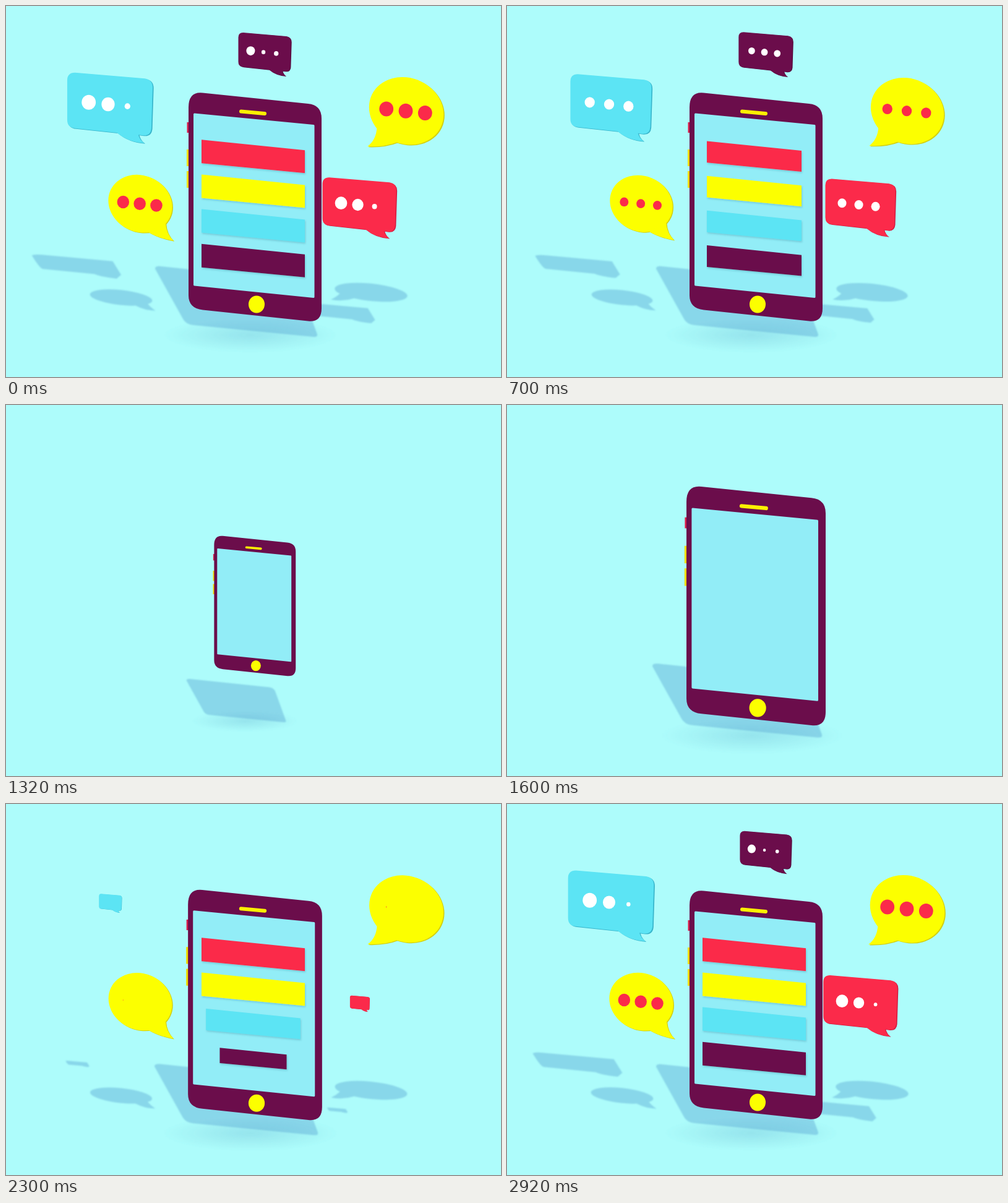
Animation of 800 by 600 pixels, one loop 2.94 s. Source, as an HTML page:

```html
<!DOCTYPE html>
<html>
<head>
<meta charset="utf-8">
<style>
html, body { margin: 0; width: 100%; height: 100%; overflow: hidden; background: #adfcfb; }
svg { display: block; width: 800px; height: 600px; }
</style>
</head>
<body>
<svg id="stage" viewBox="0 0 800 600">
  <defs>
    <!-- bubble shapes are centred on 0,0 -->
    <path id="box" d="M-67-37Q-67-49-55-49L53-40Q65-38 65-26L63 37Q62 49 50 48L43 47Q45 55 52 60Q26 58 10 44L-55 37Q-67 36-67 24Z"/>
    <g id="oval">
      <ellipse rx="59.5" ry="53.7"/>
      <path d="M-47 31Q-48 51-62 63Q-34 61-14 51Z"/>
    </g>
    <path id="boxShade" d="M-71-16Q-66-18-56-17L54-7L67 14L60 20Q34 17 26 13L-54 5Q-59 4-71-16Z"/>
    <path id="ovalShade" d="M-58 0A58 14 0 0 1 58 0A58 14 0 0 1-27 12.4Q-45 20-64 18Q-54 12-50 7Q-58 4-58 0Z"/>
    <radialGradient id="haze">
      <stop offset="0" stop-color="#5aa8c8" stop-opacity=".28"/>
      <stop offset="1" stop-color="#5aa8c8" stop-opacity="0"/>
    </radialGradient>
    <filter id="soft" x="-10%" y="-10%" width="120%" height="120%"><feGaussianBlur stdDeviation="1"/></filter>
    <filter id="lift" x="-10%" y="-20%" width="120%" height="150%">
      <feDropShadow dx="1" dy="2" stdDeviation="1.5" flood-color="#2a7f95" flood-opacity=".3"/>
    </filter>
  </defs>
  <g id="shades" fill="#5aa8d2" fill-opacity=".43" filter="url(#soft)">
    <g id="phoneShade">
      <ellipse cx="395" cy="532" rx="140" ry="28" fill="url(#haze)" fill-opacity="1"/>
      <path d="M241 425Q241 420 250 421L460 443Q470 444 475 454L503 531Q504 536 496 535L302 516Q291 515 286 506Z"/>
    </g>
  </g>
  <g id="phone">
    <path fill="#d81f4c" d="M292.500 188h5v17h-5z"/>
    <path fill="#f0dc00" d="M292 232h5v27h-5zM292 267h5v27h-5z"/>
    <path fill="#6b0d4b" d="M295 164Q295 138 318 140.500L488 158Q510 160 510 182V489Q510 512 488 509.500L318 491.500Q295 489 295 468Z"/>
    <path fill="#92edf7" stroke="#92edf7" stroke-width="3" stroke-linejoin="round" d="M304.500 175L497 193.500V470.500L304.500 451Z"/>
    <path stroke="#fbf000" stroke-width="6" stroke-linecap="round" d="M380 170.500L418 174"/>
    <ellipse fill="#fcff00" cx="405" cy="482.500" rx="13" ry="14"/>
  </g>
  <g id="bars" filter="url(#lift)"></g>
  <g id="bubbles"></g>
</svg>
<script>
const LOOP = 2940, RESTART = 952, SLOPE = 5.7;
const RED = '#fb2a4a', YELLOW = '#fcff00', BLUE = '#5ce4f4', PLUM = '#6b0d4b';
const $ = id => document.getElementById(id);

function add(parent, tag, attrs) {
  const el = document.createElementNS('http://www.w3.org/2000/svg', tag);
  for (const k in attrs) el.setAttribute(k, attrs[k]);
  return parent.appendChild(el);
}

const clamp = x => Math.max(0, Math.min(1, x));
const smooth = x => (x = clamp(x), x * x * (3 - 2 * x));
const easeOut = time => age => Math.sin(clamp(age / time) * Math.PI / 2);

// Smooth curve through points of [age in ms, scale]
function curve(points) {
  const slopeAt = i => {
    const a = points[Math.max(0, i - 1)], b = points[Math.min(points.length - 1, i + 1)];
    return (b[1] - a[1]) / (b[0] - a[0]);
  };
  return age => {
    if (age <= 0) return 0;
    const i = points.findIndex(p => p[0] > age);
    if (i < 0) return 1;
    const [x0, y0] = points[i - 1], [x1, y1] = points[i], d = x1 - x0, u = (age - x0) / d;
    const m0 = slopeAt(i - 1) * d, m1 = slopeAt(i) * d;
    return y0 + (y1 - y0) * smooth(u) + m0 * u * (1 - u) ** 2 - m1 * u * u * (1 - u);
  };
}
const rise = curve([[0, 0], [645, 1.045], [790, 1.1], [1085, 1.045], [1345, 1.008], [1600, 1]]);
const pop = curve([[0, 0], [55, .3], [123, .67], [210, .84], [337, .955], [400, 1.02],
  [520, 1.07], [670, 1.05], [760, 1.03], [1020, 1.012], [1400, 1]]);

// Each part grows from its start time and shrinks before the restart
const parts = [];
function part(el, grow, start, outStart, place) {
  parts.push({ el, grow, start, outStart, place });
}
const OUT_TIME = 230;
const about = (x, y) => s => `translate(${x} ${y}) scale(${s}) translate(${-x} ${-y})`;

part($('phone'), rise, 955, 720, about(402, 325));
part($('phoneShade'), rise, 955, 720, about(372, 478));

[RED, YELLOW, BLUE, PLUM].forEach((fill, i) => {
  const y = 243.2 + 56.2 * i;
  const bar = add($('bars'), 'path', { fill, d: 'M-83.500-27L83.500-10V27L-83.500 11Z' });
  part(bar, easeOut(290), 1922 + 83 * i, 660, s => `translate(399.500 ${y}) scale(${s})`);
});

function bubble({ shape, x, y, size, flip = 1, fill, edge, dot, start, dots, shade }) {
  const skew = shape == 'oval' ? `skewY(${SLOPE})` : '';
  const at = (px, py) => s => `translate(${px} ${py}) ${skew} scale(${flip * size * s} ${size * s})`;
  if (shade) part(add($('shades'), 'use', { href: `#${shape}Shade` }), pop, start, 690, at(...shade));
  const body = add($('bubbles'), 'g', {});
  add(body, 'use', { href: '#' + shape, fill: edge, x: 1.6 * flip, y: 1 });
  add(body, 'use', { href: '#' + shape, fill });
  part(body, pop, start, 690, at(x, y));
  const shift = shape == 'box' ? -4 : -1;
  dots.forEach((time, i) => {
    const dx = (31.3 * (i - 1) + shift) * size, dy = 3.2 * (i - 1) * size;
    const el = add($('bubbles'), 'ellipse', { rx: 11.4 * size, ry: 12 * size, fill: dot });
    part(el, easeOut(250), time, 620, s => `translate(${x + dx} ${y + dy}) scale(${s})`);
  });
}

const yellow = { shape: 'oval', fill: YELLOW, edge: '#d3cf10', dot: RED, start: 1917, dots: [2292, 2417, 2542] };
const boxed = { shape: 'box', dot: '#fff', start: 2250, dots: [2625, 2750, 2875] };
bubble({ ...yellow, x: 647, y: 169.7, size: 1, shade: [590, 463] });
bubble({ ...yellow, x: 217, y: 319.7, size: .857, flip: -1, shade: [186, 471.5] });
bubble({ ...boxed, x: 169, y: 159, size: 1, fill: BLUE, edge: '#38b5cb', shade: [116, 420] });
bubble({ ...boxed, x: 572, y: 321.5, size: .864, fill: RED, edge: '#d3193f', shade: [536, 495] });
bubble({ ...boxed, x: 418.7, y: 74.7, size: .66, fill: PLUM, edge: '#4f0838', start: 2583, dots: [2750, 2872, 2860] });

const origin = performance.now();
function draw() {
  const t = (performance.now() - origin) % LOOP;
  const leaving = t < RESTART;
  for (const p of parts) {
    let s = p.grow((leaving ? t + LOOP : t) - p.start);
    if (leaving) s *= 1 - smooth((t - p.outStart) / OUT_TIME);
    p.el.setAttribute('visibility', s > .001 ? 'visible' : 'hidden');
    p.el.setAttribute('transform', p.place(s));
  }
  requestAnimationFrame(draw);
}
draw();
</script>
</body>
</html>
```
